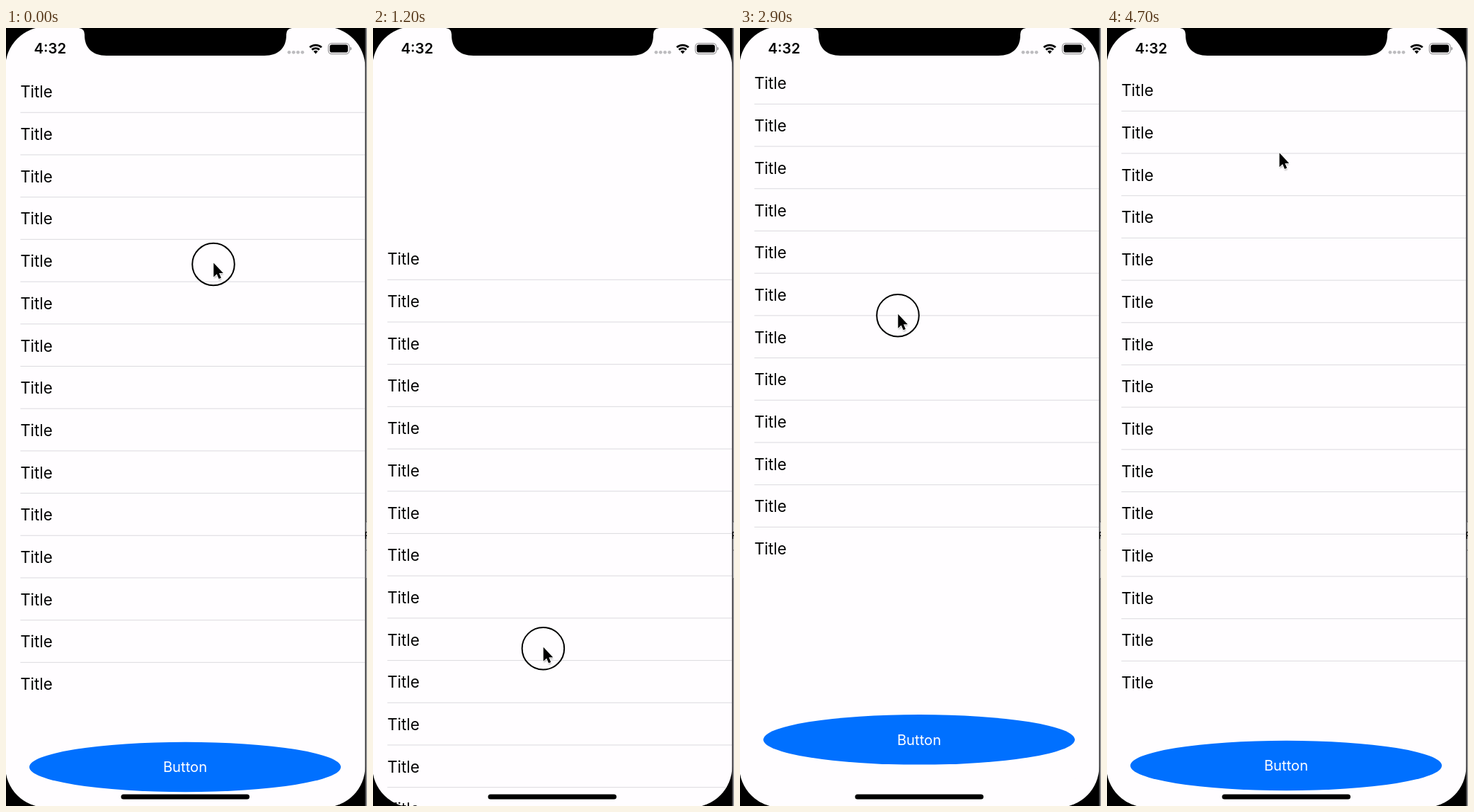
An HTML page for the animation above (4800 ms loop, 510x1098 px).

```html
<!DOCTYPE html>
<html lang="en">
<head>
<meta charset="utf-8">
<title>Pull list with sticky button</title>
<style>
html, body { margin: 0; width: 100%; height: 100%; overflow: hidden; background: #000; }
svg { display: block; width: 100vw; height: 100vh; }
text { font-family: Inter, Roboto, sans-serif; }
#rows text { font-size: 22.3px; }
#rows rect { fill: #dedde1; }
</style>
</head>
<body>
<svg viewBox="0 0 510 1098">
  <defs>
    <clipPath id="screen"><rect x="-1" y="-2" width="508.5" height="1102" rx="58"/></clipPath>
    <clipPath id="safe"><rect y="57.5" width="507.5" height="1041"/></clipPath>
    <filter id="soft" x="-50%" y="-50%" width="200%" height="200%"><feGaussianBlur stdDeviation="1.3"/></filter>
  </defs>
  <rect width="510" height="1098"/>

  <g clip-path="url(#screen)">
    <rect width="510" height="1098" fill="#fffdff"/>
    <g clip-path="url(#safe)">
      <g id="rows"></g>
      <g id="button">
        <ellipse cx="253" rx="220" ry="35.3" fill="#0070ff"/>
        <text x="253" y="7.3" font-size="20.2" fill="#fff" text-anchor="middle">Button</text>
      </g>
    </g>
  </g>

  <!-- status bar -->
  <path d="M103 0Q111 1 111 9V10C111 28 122 39 142 39H365C385 39 396 28 396 10V9Q396 1 404 0Z"/>
  <text x="39.5" y="36.4" font-size="20.3" font-weight="600">4:32</text>
  <g fill="#bdbcbf">
    <circle cx="400" cy="34.3" r="2.4"/><circle cx="406.3" cy="34.3" r="2.4"/>
    <circle cx="412.5" cy="34.3" r="2.4"/><circle cx="418.8" cy="34.3" r="2.4"/>
  </g>
  <g id="wifi" transform="translate(437.5 36.5)" fill="none" stroke="#000" stroke-width="2.9"></g>
  <rect x="455.4" y="21.6" width="29.6" height="15" rx="4.6" fill="none" stroke="#9c9b9d" stroke-width="1.3"/>
  <rect x="457.4" y="23.6" width="25.6" height="11" rx="2.8"/>
  <path d="M486.2 26.4Q488.4 27.2 488.4 29.1T486.2 31.8Z" fill="#9c9b9d"/>
  <rect x="162.5" y="1081.4" width="181.5" height="7" rx="3.5"/>

  <!-- window edge on the right -->
  <rect x="507.3" width="1.4" height="1098" fill="#4a4a4c"/>
  <rect x="508.7" width="1.3" height="1098" fill="#a9a9ab"/>
  <rect x="508.7" y="697" width="1.3" height="80" fill="#c9c9cb"/>
  <path d="M508.7 697H510M508.7 737H510M508.7 777H510" stroke="#666"/>
  <text x="506.6" y="721" font-size="13">F</text>

  <g id="pointer">
    <circle id="ring" r="29.8" fill="none" stroke="#000" stroke-width="2"/>
    <g transform="translate(.3 -2)">
      <path d="M0 0V20L4.5 15.8 7.4 22.6 10.6 21.2 7.8 14.6H13.6Z" transform="translate(.5 2)" opacity=".4" filter="url(#soft)"/>
      <path d="M0 0V20L4.5 15.8 7.4 22.6 10.6 21.2 7.8 14.6H13.6Z" stroke="#fff" stroke-width="2" paint-order="stroke"/>
    </g>
  </g>
</svg>
<script>
const LOOP = 4800, STEP = 100, PITCH = 59.7, ROWS = 15;
const BUTTON_Y = 1041, STICKY_Y = 1004.3, STIFF = 0.014;
const $ = id => document.getElementById(id);

// Each key: time, finger x, finger y, list offset
const pull = [
  [0, 293, 333.5, 2], [100, 291, 390, 34], [200, 284, 500, 86], [400, 264, 693.5, 163.5],
  [600, 252, 801, 211], [800, 245, 850, 228], [1200, 240.4, 875.7, 238]
];
const push = [
  [2200, 240.4, 875.7, 0], [2400, 239.5, 864, -.5], [2500, 238, 840, -3], [2600, 235, 798, -14],
  [2700, 231, 705, -60], [2900, 223, 405.7, -189], [3000, 226, 310, -228],
  [3200, 239, 208, -265], [3500, 246, 169.5, -279]
];

// Monotone cubic through column c of the keys
function track(keys, c, t) {
  const last = keys.length - 1;
  if (t <= keys[0][0]) return keys[0][c];
  if (t >= keys[last][0]) return keys[last][c];
  const slope = i => (keys[i + 1][c] - keys[i][c]) / (keys[i + 1][0] - keys[i][0]);
  const tangent = i => {
    if (i === 0) return slope(0);
    if (i === last) return 0;
    const a = slope(i - 1), b = slope(i);
    return a * b <= 0 ? 0 : 2 * a * b / (a + b);
  };
  let i = 0;
  while (t >= keys[i + 1][0]) i++;
  const h = keys[i + 1][0] - keys[i][0], u = (t - keys[i][0]) / h, v = 1 - u;
  return v * v * ((1 + 2 * u) * keys[i][c] + h * u * tangent(i)) +
         u * u * ((1 + 2 * v) * keys[i + 1][c] - h * v * tangent(i + 1));
}

// Critically damped return to rest
const bounce = (from, ms) => from * (1 + STIFF * ms) * Math.exp(-STIFF * ms);

function offset(t) {
  if (t < 1300) return track(pull, 3, t);
  if (t < 2200) return bounce(238, t - 1300);
  if (t < 3700) return track(push, 3, t);
  return bounce(-279, t - 3700);
}

function finger(t) {
  if (t >= 4700) return [243.3, 178.3];
  const keys = t < 2200 ? pull : push;
  return [track(keys, 1, t), track(keys, 2, t)];
}

function build() {
  let rows = '';
  for (let i = 0; i < ROWS; i++) {
    const y = i * PITCH;
    rows += `<text x="20.2" y="${96.3 + y}">Title</text>`;
    if (i < ROWS - 1) rows += `<rect x="20.3" y="${116.7 + y}" width="487" height="1.1"/>`;
  }
  $('rows').innerHTML = rows;
  const arc = r => `M${-.67 * r} ${-.743 * r}A${r} ${r} 0 0 1 ${.67 * r} ${-.743 * r}`;
  $('wifi').innerHTML = `<path d="${arc(12.4)}"/><path d="${arc(7.9)}"/>` +
    `<path d="${arc(4.6)}L0 0Z" fill="#000" stroke="none"/>`;
}

const move = (id, x, y) => $(id).setAttribute('transform', `translate(${x.toFixed(2)} ${y.toFixed(2)})`);

function draw(ms) {
  const t = Math.floor(ms % LOOP / STEP) * STEP;
  const d = offset(t);
  move('rows', 0, d);
  move('button', 0, Math.max(STICKY_Y, BUTTON_Y + d));
  move('pointer', ...finger(t));
  const down = t < 1300 || (t >= 2300 && t < 3700);
  $('ring').style.display = down ? '' : 'none';
}

build();
draw(0);
let start;
requestAnimationFrame(function tick(now) {
  start ??= now;
  draw(now - start);
  requestAnimationFrame(tick);
});
</script>
</body>
</html>
```
